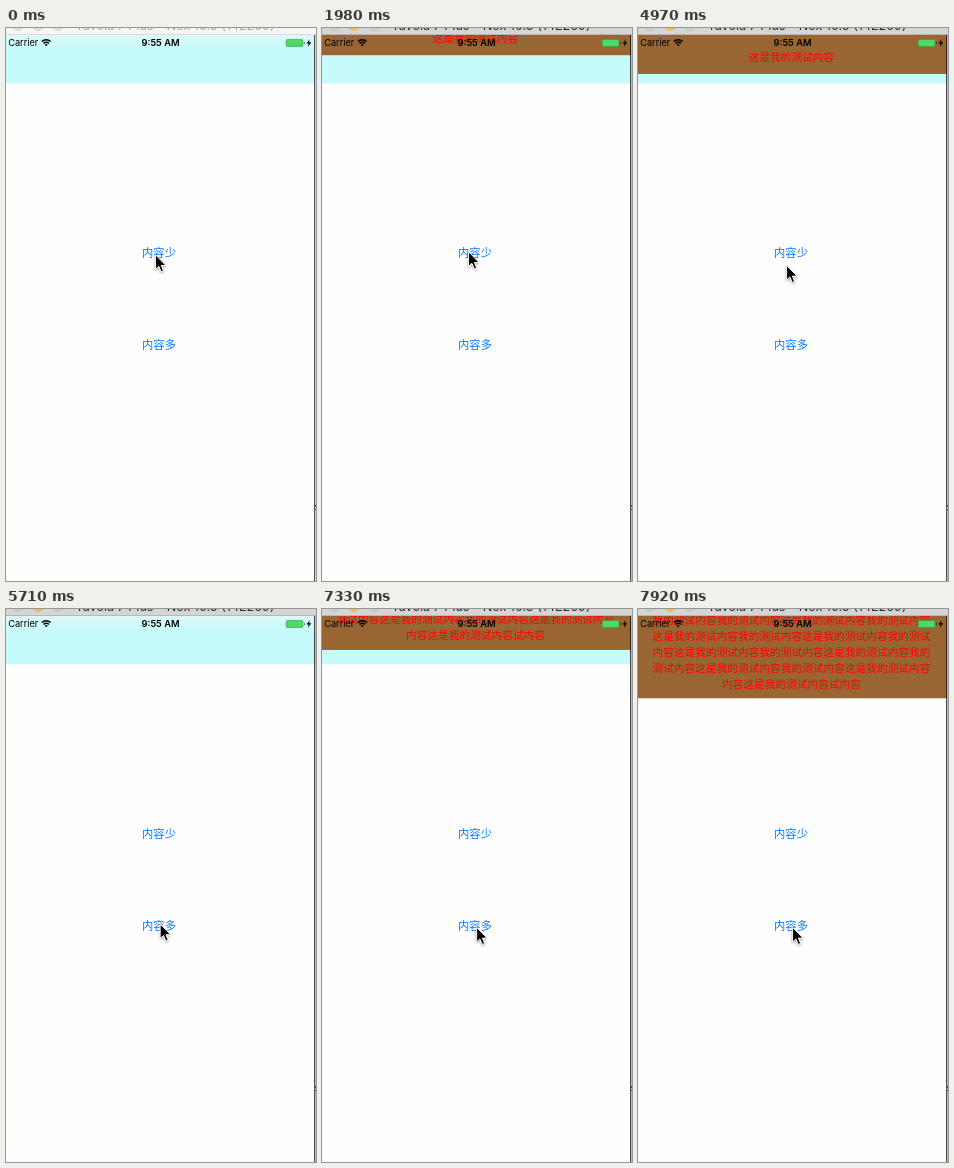
Recreate the animation shown at these times as an HTML page. Size 310 by 553 pixels, loop 8000 ms.

```html
<!DOCTYPE html>
<html lang="zh-CN">
<head>
<meta charset="utf-8">
<style>
  html, body { margin: 0; width: 310px; height: 553px; overflow: hidden; background: #fefefe; }
  svg { display: block; }
  text { font-family: Inter, Roboto, sans-serif; }
  .mid { text-anchor: middle; }
  .cjk text { font-family: "Noto Sans CJK SC", "Noto Sans CJK", sans-serif; text-anchor: middle; }
  .button { font-size: 11.3px; fill: #067bfc; }
  .banner { font-size: 10.7px; fill: #f00; }
</style>
</head>
<body>
<svg width="310" height="553" viewBox="0 0 310 553">
  <defs>
    <linearGradient id="sky" x2="0" y2="1">
      <stop offset="0" stop-color="#ddf9f8"/>
      <stop offset=".3" stop-color="#c7fbfb"/>
    </linearGradient>
    <filter id="soft" x="-50%" y="-50%" width="200%" height="200%">
      <feDropShadow dx="0" dy="1" stdDeviation=".8" flood-opacity=".4"/>
    </filter>
  </defs>

  <rect y="7" width="309" height="48.4" fill="url(#sky)"/>
  <g class="cjk button">
    <text id="few" x="153" y="228.8">内容少</text>
    <text id="many" x="153" y="321.3">内容多</text>
  </g>

  <g id="banner" class="cjk banner">
    <rect y="-120" width="309" height="120" fill="#963"/>
    <g id="rows"></g>
  </g>

  <g id="status">
    <text x="2.2" y="18.2" font-size="9.2">Carrier</text>
    <g fill="none" stroke="#000" stroke-width="1.4">
      <path d="M35.8 13.6a6.2 6.2 0 0 1 8.8 0M37.5 15.4a3.8 3.8 0 0 1 5.4 0"/>
    </g>
    <path d="M38.7 16.7a2.1 2.1 0 0 1 3 0l-1.5 1.6z"/>
    <text class="mid" x="154.5" y="18.2" font-size="9.3" font-weight="600">9:55 AM</text>
    <rect x="280.2" y="11.4" width="16.8" height="7.2" rx="1.4" fill="#4cd964" stroke="#37924a" stroke-width=".6"/>
    <path d="M298 13.6q1.4 1.4 0 2.8z"/>
    <path d="M303.8 11l-3.3 4.4h2.2l-1 3.6 3.6-4.7h-2.3z"/>
  </g>

  <g id="titlebar">
    <rect id="bar" width="310" height="7"/>
    <rect id="rim" y="6" width="310" height="1"/>
    <g id="lights" stroke-width=".6">
      <circle cx="12" cy="-3.3" r="6"/>
      <circle id="amber" cx="32" cy="-3.3" r="6"/>
      <circle cx="52" cy="-3.3" r="6"/>
    </g>
    <text id="title" class="mid" x="169" y="1.6" font-size="12.6">Tavola 7 Plus – Nex 10.3 (14E269)</text>
  </g>

  <rect x="308" y="7" width="1" height="546" opacity=".7"/>
  <rect id="shade" x="309" y="7" width="1" height="546"/>
  <path d="M309 477h1v2h-1zM309 481h1v1h-1z" fill="#555"/>
  <path id="cursor" d="M0 0V14.6L3.3 11.5 5.7 17 8 16 5.7 10.7H10.4Z" stroke="#fff" stroke-width=".9" filter="url(#soft)"/>
</svg>
<script>
const LOOP = 8000, SLIDE = 2000, FEW_AT = 958, MANY_AT = 6518, HIDE_AT = 5110;
const $ = id => document.getElementById(id);
const paint = (id, fill) => $(id).setAttribute('fill', fill);
const move = (id, x, y) => $(id).setAttribute('transform', `translate(${x} ${y})`);

const whole = '这是我的测试内容', part = '我的测试内容', unit = whole + part;
const few = { height: 39, base: -13.4, rows: [whole] };
const many = {
  height: 101.5, base: -10.6,
  rows: [
    part + part + unit,
    unit + whole + '我的测试',
    '内容' + unit + whole + '我的',
    '测试内容' + unit + whole,
    '内容' + whole + '试内容'
  ]
};

// time, x, y of the pointer tip
const pointer = [
  [0, 149.5, 226.8], [500, 148, 225.2], [650, 146.6, 223.8],
  [4965, 148.6, 237.4], [5110, 151.5, 268], [5260, 153.8, 304],
  [5560, 154, 309], [5710, 154.2, 315], [5855, 154.4, 321],
  [6005, 154.5, 320], [6150, 154.6, 318.4]
];

function easeInOut(x) {
  if (x <= 0 || x >= 1) return x <= 0 ? 0 : 1;
  let lo = 0, hi = 1, u;
  for (let i = 0; i < 24; i++) {
    u = (lo + hi) / 2;
    const bx = 3 * u * (1 - u) * (.42 * (1 - u) + .58 * u) + u ** 3;
    if (bx < x) lo = u; else hi = u;
  }
  return u * u * (3 - 2 * u);
}

// a tapped button dims, then fades back
const tapped = (t, at) => t < at - 95 ? 1 : Math.min(1, .2 + .8 * Math.max(0, t - at) / 320);

let shown;
function fill(panel) {
  if (panel === shown) return;
  shown = panel;
  $('rows').innerHTML = panel.rows.map((row, i) =>
    `<text x="153.5" y="${panel.base - 16 * (panel.rows.length - 1 - i)}">${row}</text>`).join('');
}

function draw(now) {
  const real = now % LOOP;
  const t = 940 + Math.floor((real - 940) / 148.4) * 148.4;

  const second = t >= HIDE_AT - 10;
  const panel = second ? many : few;
  fill(panel);
  const p = easeInOut((t - (second ? MANY_AT : FEW_AT)) / SLIDE);
  move('banner', 0, 7 + panel.height * p);
  $('banner').setAttribute('visibility', p > 0 ? 'visible' : 'hidden');

  $('few').setAttribute('opacity', tapped(t, FEW_AT));
  $('many').setAttribute('opacity', tapped(t, MANY_AT));

  const active = t >= 940;
  paint('bar', active ? '#d6d5d6' : '#f6f6f6');
  paint('rim', active ? '#b8b6b8' : '#dcdcdc');
  paint('title', active ? '#2c2c2c' : '#a9a9a9');
  paint('lights', active ? '#cdcccd' : '#dedede');
  $('lights').setAttribute('stroke', active ? '#bdbcbd' : '#cfcfcf');
  paint('amber', active ? '#fcbd2e' : '#dedede');
  paint('shade', active ? '#b8b8b8' : '#d6d6d6');

  const [, x, y] = pointer.findLast(k => k[0] <= real);
  move('cursor', x, y);
  requestAnimationFrame(loop);
}

const start = performance.now();
function loop() { draw(performance.now() - start); }
loop();
</script>
</body>
</html>
```
